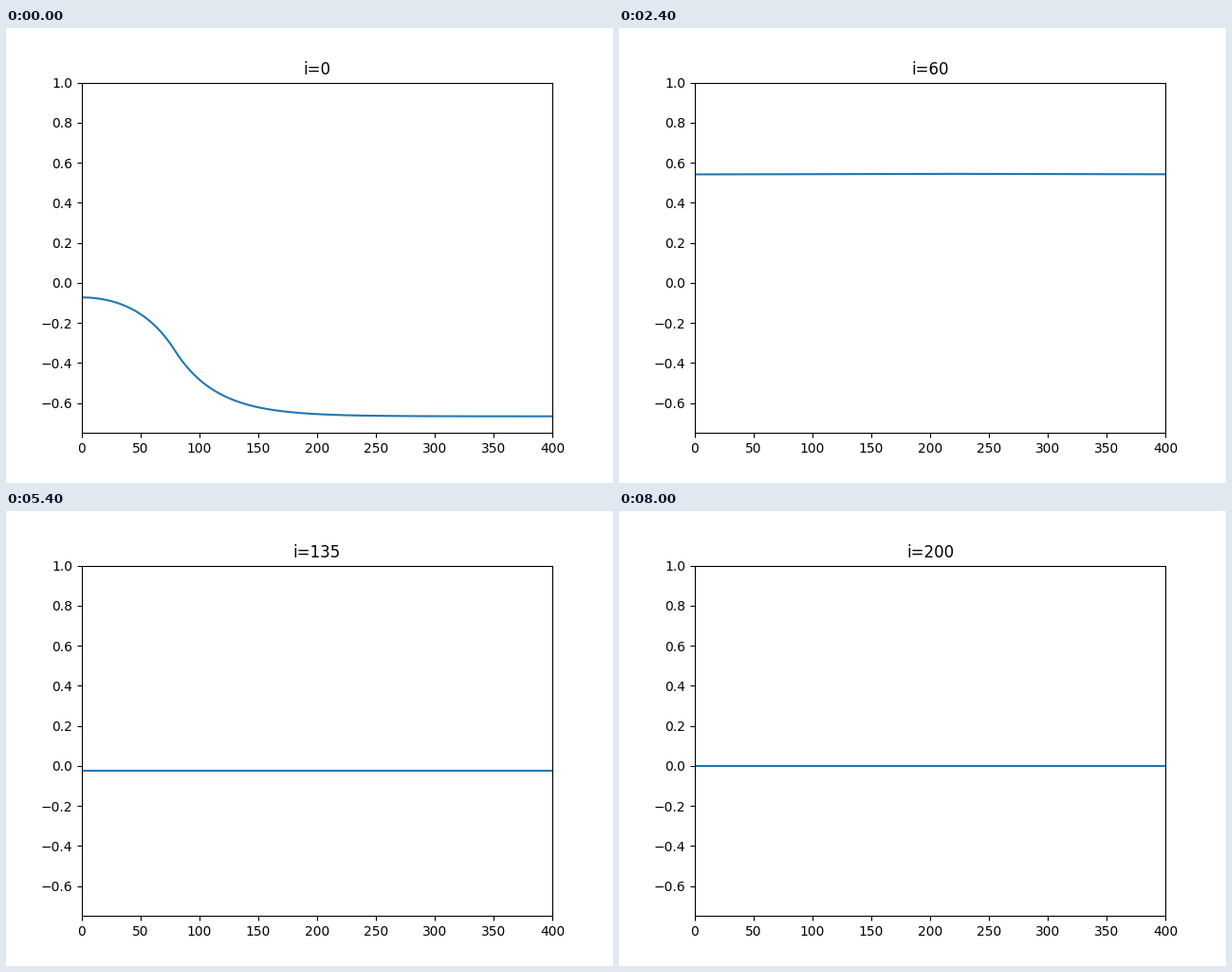
Write a matplotlib script that moves like this. It is 640 px wide and 480 px high and loops after 8200 ms.

```python
import numpy as np
import matplotlib.pyplot as plt
from matplotlib.animation import FuncAnimation

N = 400          # cable length in cells
STEP = 5         # simulation steps per picture
LAST = 200
REST = -0.667    # level ahead of the stimulated part
EDGE = 79        # width of the stimulated part
REACH = 35.7     # diffusion length of the first step

x = np.arange(N + 1)
s = x / N

# Turning points of the pulse: rise, plateau, drop, undershoot, recovery
times = np.array([5, 10, 30, 60, 75, 90, 115, 158, 200])
levels = np.array([0.72, 0.91, 0.795, 0.543, -0.25, -0.1835, -0.0705, 0.004, 0])


def monotone_slopes(t, y):
    """Harmonic mean of neighbouring slopes, flat at every extremum."""
    d = np.diff(y) / np.diff(t)
    a, b = d[:-1], d[1:]
    inner = np.where(a * b > 0, 2 * a * b / (a + b), 0)
    return np.concatenate([[0], inner, [0]])


slopes = monotone_slopes(times, levels)


def level(t):
    """Cubic Hermite curve through the turning points."""
    k = np.clip(np.searchsorted(times, t) - 1, 0, len(times) - 2)
    h = times[k + 1] - times[k]
    r = (t - times[k]) / h
    ease = r * r * (3 - 2 * r)
    return (levels[k] + (levels[k + 1] - levels[k]) * ease
            + h * r * (1 - r) * (slopes[k] * (1 - r) - slopes[k + 1] * r))


def start_profile():
    """A step smoothed by one implicit diffusion step, sealed at x = 0."""
    inner = np.exp(-EDGE / REACH) * np.cosh(np.minimum(x, EDGE) / REACH)
    outer = 1 - np.sinh(EDGE / REACH) * np.exp(-x / REACH)
    return REST * np.where(x < EDGE, inner, outer)


def bump(t, width):
    return np.exp(-((t - 30) / width) ** 2)


def profile(i):
    if i == 0:
        return start_profile()
    tilt = 0.0265 * bump(i, 14)
    bend = 0.0048 * bump(i, 25)
    return level(i) - tilt * np.cos(np.pi * s) - bend * np.cos(2 * np.pi * s)


fig, ax = plt.subplots(figsize=(6.4, 4.8), dpi=100)
ax.set_xlim(0, N)
ax.set_ylim(-0.75, 1.0)
line, = ax.plot(x, profile(0))
title = ax.set_title("i=0")


def draw(frame):
    i = frame * STEP
    line.set_ydata(profile(i))
    title.set_text(f"i={i}")
    return line, title


anim = FuncAnimation(fig, draw, frames=LAST // STEP + 1, interval=200,
                     repeat=True, repeat_delay=0, blit=False)
plt.show()
```
